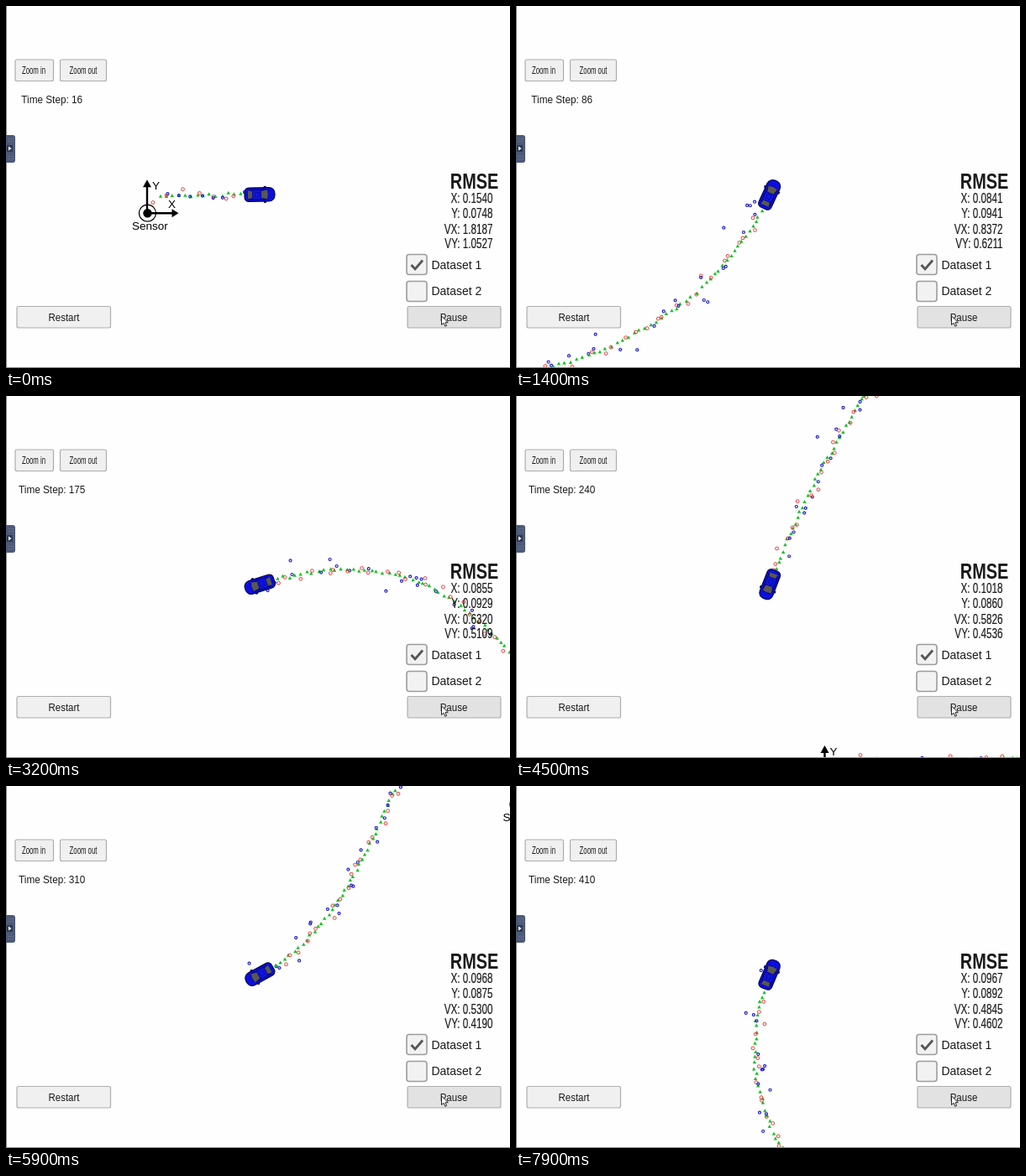
An HTML page with a canvas that plays this animation: 600x432 px, repeating every 8000 ms.

```html
<!DOCTYPE html>
<html lang="en">
<head>
<meta charset="utf-8">
<title>Tracking simulator</title>
<style>
  html, body { margin: 0; width: 100%; height: 100%; overflow: hidden; background: #fefefe; }
  canvas, svg { position: absolute; left: 0; top: 0; width: 600px; height: 432px; }
  text { font-family: "Liberation Sans", Arial, sans-serif; fill: #1a1a1a; }
  .mid { text-anchor: middle; }
  .end { text-anchor: end; }
  .btn { fill: #f0f0f0; stroke: #adadad; stroke-width: 1.2; }
  .down { fill: #e2e2e2; }
  .box { fill: #f2f2f2; stroke: #9c9c9c; stroke-width: 1.6; }
</style>
</head>
<body>
<canvas id="world" width="600" height="432"></canvas>
<svg viewBox="0 0 600 432">
  <path d="M.5 0V432M0 431.5H600" stroke="#8e8e8e" fill="none"/>

  <g id="handle">
    <path d="M0 154H8Q11 154 11 157V184Q11 187 8 187H0Z" fill="#4d5a78"/>
    <path d="M3 158.5H9M3 161.5H9M3 179.5H9M3 182.5H9" stroke="#74809a" stroke-dasharray="1 1.5"/>
    <rect x="1" y="166" width="7" height="8" fill="#303a50"/>
    <path d="M3 167.5L6.5 170L3 172.5Z" fill="#fff"/>
  </g>

  <rect class="btn" x="11" y="64" width="45.5" height="25.5" rx="2"/>
  <rect class="btn" x="64.5" y="64" width="55" height="25.5" rx="2"/>
  <g class="mid" font-size="12">
    <text transform="translate(33 81) scale(.65 1)">Zoom in</text>
    <text transform="translate(92 81) scale(.65 1)">Zoom out</text>
  </g>
  <text id="step" class="mid" font-size="12.8" transform="translate(54.7 116) scale(.92 1)"></text>

  <text class="mid" font-size="26.5" font-weight="bold" transform="translate(557.5 218) scale(.75 1)">RMSE</text>
  <g id="errors" class="end" font-size="16" stroke="#1a1a1a" stroke-width=".2">
    <text transform="translate(579.5 235) scale(.73 1)"></text>
    <text transform="translate(579.5 253) scale(.73 1)"></text>
    <text transform="translate(579.5 271.5) scale(.73 1)"></text>
    <text transform="translate(579.5 288.5) scale(.73 1)"></text>
  </g>

  <rect class="box" x="477" y="296.5" width="24" height="24" rx="3"/>
  <rect class="box" x="477" y="328.5" width="24" height="24" rx="3"/>
  <path d="M482.5 309L487 314L496 303.5" fill="none" stroke="#555" stroke-width="2.8"/>
  <g font-size="15.2">
    <text transform="translate(506.5 314) scale(.92 1)">Dataset 1</text>
    <text transform="translate(506.5 345) scale(.92 1)">Dataset 2</text>
  </g>

  <rect class="btn" x="13" y="358.5" width="111.5" height="25.5" rx="2"/>
  <rect class="btn down" x="478" y="358.5" width="111" height="25.5" rx="2"/>
  <g class="mid" font-size="12.5">
    <text transform="translate(69 375.5) scale(.92 1)">Restart</text>
    <text transform="translate(533 375.5) scale(.92 1)">Pause</text>
  </g>
  <path d="M518.5 370V380.5L521 378.3L522.8 382.3L524.6 381.5L522.9 377.7H526.3Z" fill="#fff" stroke="#111" stroke-width=".9"/>
</svg>

<script>
const LOOP = 8000, TICK = 100, SCALE = 28, SPEED = 7.2;
const CAR = { x: 302, y: 225 };

// Turning points of the figure eight around the sensor: step, x, y, heading in degrees
const route = [
  [0, 15, -21, 0], [30, 237, -25, -2], [86, 567, -240, -66], [129, 515, -511, -134],
  [152, 378, -602, -168], [175, 217, -590, -198], [205, 47, -457, -237], [240, -66, -232, -249],
  [270, -147, -18, -246], [310, -308, 203, -208], [337, -497, 269, -183], [366, -695, 207, -141],
  [380, -754, 129, -119], [410, -768, -78, -66]
];

// What the panel reads at a few ticks: tick, step, X, Y, VX, VY
const readings = [
  [0, 16, .1540, .0748, 1.8187, 1.0527],
  [14, 86, .0841, .0941, .8372, .6211],
  [32, 175, .0855, .0929, .6320, .5109],
  [45, 240, .1018, .0860, .5826, .4536],
  [59, 310, .0968, .0875, .5300, .4190],
  [70, 366, .1011, .0879, .5015, .4640],
  [79, 410, .0967, .0892, .4845, .4602]
];

const mix = (a, b, u) => a + (b - a) * u;

function segment(table, key) {
  let i = 0;
  while (i < table.length - 2 && key > table[i + 1][0]) i++;
  return [table[i], table[i + 1]];
}

// Smooth curve that leaves and reaches each turning point along its heading
function place(step) {
  const [[s0, x0, y0, h0], [s1, x1, y1, h1]] = segment(route, step);
  const u = (step - s0) / (s1 - s0), v = 1 - u;
  const pull = (s1 - s0) * SPEED * u * v;
  const a = h0 * Math.PI / 180, b = h1 * Math.PI / 180;
  const ease = u * u * (3 - 2 * u);
  return {
    x: mix(x0, x1, ease) + pull * (v * Math.cos(a) - u * Math.cos(b)),
    y: mix(y0, y1, ease) + pull * (v * Math.sin(a) - u * Math.sin(b))
  };
}

function heading(step) {
  const a = place(step - 1), b = place(step);
  return Math.atan2(b.y - a.y, b.x - a.x);
}

let seed = 7;
function random() {
  seed = (seed * 1664525 + 1013904223) % 4294967296;
  return seed / 4294967296;
}
// Roughly normal, bounded spread
const noise = sd => sd * (random() + random() + random() - 1.5) * 2;

// Laser and radar take turns; radar spreads with range
const trail = Array.from({ length: 411 }, (_, step) => {
  const p = place(step), range = Math.hypot(p.x, p.y);
  const guess = { x: p.x + noise(1), y: p.y + noise(1) };
  const laser = step % 2 === 0;
  if (laser) return { guess, laser, x: p.x + noise(.15 * SCALE), y: p.y + noise(.15 * SCALE) };
  const along = noise(.25 * SCALE) / range, across = noise(.024);
  return {
    guess, laser,
    x: p.x * (1 + along) - p.y * across,
    y: p.y * (1 + along) + p.x * across
  };
});

const ctx = document.getElementById("world").getContext("2d");
const stepText = document.getElementById("step");
const errorTexts = document.querySelectorAll("#errors text");

function disc(x, y, r) {
  ctx.beginPath();
  ctx.arc(x, y, r, 0, 2 * Math.PI);
}

function shape(color, points) {
  ctx.fillStyle = color;
  ctx.beginPath();
  for (const [x, y] of points) ctx.lineTo(x, y);
  ctx.fill();
}

function drawSensor() {
  ctx.strokeStyle = ctx.fillStyle = "#000";
  ctx.lineWidth = 1.2;
  disc(0, 0, 10);
  ctx.stroke();
  disc(0, 0, 5.2);
  ctx.fill();
  ctx.lineWidth = 2.4;
  ctx.beginPath();
  ctx.moveTo(-.5, -33);
  ctx.lineTo(-.5, 0);
  ctx.lineTo(30, 0);
  ctx.stroke();
  shape("#000", [[-.5, -40], [-5.5, -31], [4.5, -31]]);
  shape("#000", [[37, 0], [29, -5], [29, 5]]);
  ctx.font = '13.5px "Liberation Sans", Arial, sans-serif';
  ctx.textAlign = "center";
  ctx.fillText("Y", 10, -28);
  ctx.fillText("X", 29, -6);
  ctx.fillText("Sensor", 3, 20);
}

function drawTrail(count) {
  for (const mark of trail.slice(0, count + 1)) {
    const { x, y } = mark.guess;
    shape("#16c022", [[x, y - 2.2], [x + 2.2, y + 1.8], [x - 2.2, y + 1.8]]);
    ctx.strokeStyle = mark.laser ? "#e23a3a" : "#1c1cc8";
    ctx.lineWidth = mark.laser ? 1 : 1.2;
    disc(mark.x, mark.y, mark.laser ? 1.9 : 1.5);
    ctx.stroke();
  }
}

function drawCar(angle) {
  ctx.save();
  ctx.translate(CAR.x, CAR.y);
  ctx.rotate(angle);
  shape("#06064a", [[5, -10], [8, -10], [6, 0], [8, 10], [5, 10], [3, 0]]);
  ctx.beginPath();
  ctx.roundRect(-18, -8.2, 36, 16.4, [5, 7, 7, 5]);
  ctx.fillStyle = "#0a0ee0";
  ctx.fill();
  ctx.strokeStyle = "#06064a";
  ctx.lineWidth = 1.2;
  ctx.stroke();
  ctx.beginPath();
  ctx.roundRect(-14.5, -6.5, 25, 13, 4);
  ctx.fillStyle = "#080a90";
  ctx.fill();
  shape("#5a5850", [[-14, -5], [-9, -4], [-9, 4], [-14, 5]]);
  shape("#5a5850", [[2, -4], [9, -5.5], [10, 0], [9, 5.5], [2, 4]]);
  shape("#1016e8", [[-8, -5], [1, -5], [1, 5], [-8, 5]]);
  ctx.strokeStyle = "#080a90";
  ctx.lineWidth = .8;
  ctx.strokeRect(-5.5, -2.5, 5, 5);
  ctx.restore();
}

function draw(tick) {
  const [a, b] = segment(readings, tick);
  const step = Math.round(mix(a[1], b[1], (tick - a[0]) / (b[0] - a[0])));
  const u = (step - a[1]) / (b[1] - a[1]);

  stepText.textContent = "Time Step: " + step;
  ["X", "Y", "VX", "VY"].forEach((name, k) => {
    // Squared errors add up evenly between readings
    const total = mix(a[1] * a[k + 2] ** 2, b[1] * b[k + 2] ** 2, u);
    errorTexts[k].textContent = `${name}: ${Math.sqrt(total / step).toFixed(4)}`;
  });

  const p = place(step);
  ctx.clearRect(0, 0, 600, 432);
  ctx.save();
  ctx.translate(CAR.x - p.x, CAR.y - p.y);
  drawSensor();
  drawTrail(step);
  ctx.restore();
  drawCar(heading(step));
}

const start = performance.now();
let shown = -1;
function play() {
  const tick = Math.floor((performance.now() - start) % LOOP / TICK);
  if (tick !== shown) draw(shown = tick);
  requestAnimationFrame(play);
}
play();
</script>
</body>
</html>
```
